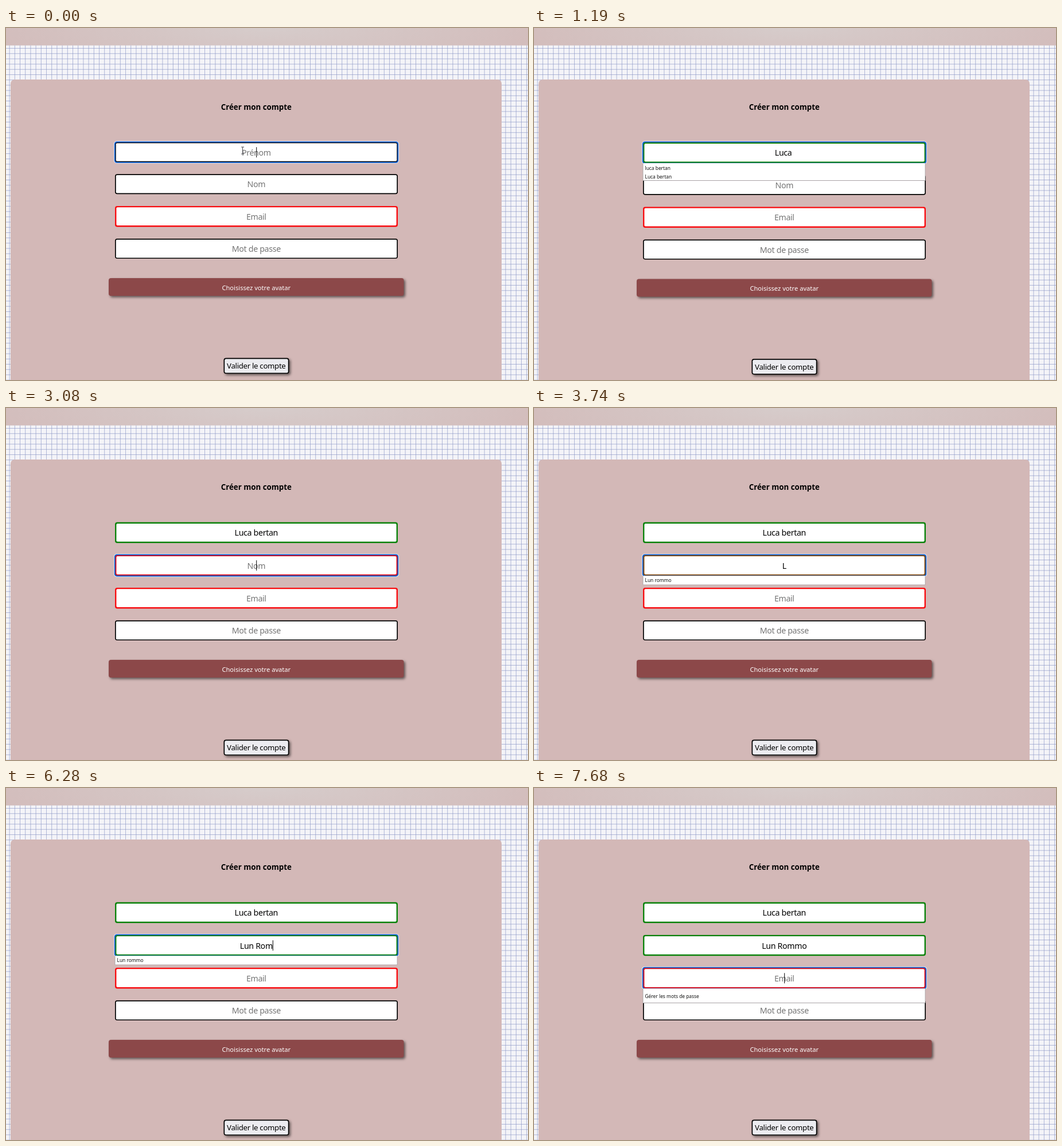
Write an HTML page with a canvas that moves like this. It is 910 by 615 pixels and loops after 8000 ms.

```html
<!DOCTYPE html>
<html lang="fr">
<head>
<meta charset="utf-8">
<title>Créer mon compte</title>
<style>
html, body { margin: 0; width: 100%; height: 100%; overflow: hidden; background: #f4f4f8; }
canvas { display: block; width: 910px; height: 615px; }
</style>
</head>
<body>
<canvas id="stage" width="910" height="615"></canvas>
<script>
const ctx = document.getElementById('stage').getContext('2d');
const LOOP = 8000, MID = 436.3, LEFT = 190, WIDTH = 493;
const FONT = '"Noto Sans", "Open Sans", sans-serif';
const GREEN = '#0a820a', RED = '#f80c10', BLACK = '#000';

const FIRST = 'Luca bertan', LAST = 'Lun Rommo';
// moment at which each letter is typed
const firstKeys = [330, 530, 730, 930, 1130, 1400, 1530, 1600, 1790, 2010, 2140];
const lastKeys = [3670, 3940, 4280, 4740, 5750, 5950, 6280, 6420, 7010];
const lastLetters = ['L', 'u', 'n', ' ', 'R', 'o', 'm', 'm', 'o'];
// caret toggles, starting visible
const blinks = [130, 660, 1190, 1720, 2270, 2800, 3470, 4000, 4540, 5090, 5620, 6150, 6680, 7210];
const FOCUS_LAST = 2930, FOCUS_MAIL = 7610;

const typed = (text, keys, t) => text.slice(0, keys.filter(k => t >= k).length);

function box(x, y, w, h, r, color) {
  ctx.fillStyle = color;
  ctx.beginPath();
  ctx.roundRect(x, y, w, h, r);
  ctx.fill();
}

function shadowBox(x, y, w, h, r, color) {
  ctx.save();
  ctx.shadowColor = 'rgba(0,0,0,.55)';
  ctx.shadowBlur = 4;
  ctx.shadowOffsetX = ctx.shadowOffsetY = 2.5;
  box(x, y, w, h, r, color);
  ctx.restore();
}

function label(text, x, y, size, color, opt = {}) {
  ctx.font = `${opt.weight || 400} ${size}px ${FONT}`;
  ctx.letterSpacing = (opt.spacing || 0) + 'px';
  ctx.fillStyle = color;
  const w = ctx.measureText(text).width;
  ctx.fillText(text, opt.left ? x : x - w / 2, y);
  return w;
}

function grid() {
  ctx.fillStyle = '#f4f4f8';
  ctx.fillRect(0, 0, 910, 615);
  ctx.fillStyle = 'rgba(135,145,195,.62)';
  const step = 9.2;
  for (let x = 5.6; x < 910; x += step) ctx.fillRect(x, 30, 1, 585);
  for (let y = 35; y < 615; y += step) ctx.fillRect(0, y, 910, 1);
}

function header() {
  ctx.save();
  ctx.beginPath();
  ctx.rect(0, 0, 910, 30.5);
  ctx.clip();
  ctx.translate(455, 0);
  ctx.scale(1, .16);
  const g = ctx.createRadialGradient(0, 0, 0, 0, 0, 480);
  g.addColorStop(0, '#d6cccb');
  g.addColorStop(1, '#d3bdbc');
  ctx.fillStyle = g;
  ctx.fillRect(-455, 0, 910, 200);
  ctx.restore();
}

function field(y, f, caret) {
  const h = f.thick ? 36.5 : 35;
  const line = f.thick ? 2.4 : 1.7;
  if (f.focus) {
    box(LEFT - 2, y - 2, WIDTH + 4, h + 4, 5, '#eef2fb');
    box(LEFT - 1.2, y - 1.2, WIDTH + 2.4, h + 2.4, 4.5, '#0b5fd0');
    box(LEFT + .6, y + .6, WIDTH - 1.2, h - 1.2, 3.5, f.color);
  } else {
    box(LEFT, y, WIDTH, h, 4, f.color);
  }
  box(LEFT + line, y + line, WIDTH - 2 * line, h - 2 * line, 2, '#fff');
  const top = y + (h - 36.5) / 2;
  const w = label(f.value || f.hint, MID, top + 23.9, 14.2, f.value ? BLACK : '#757575', { spacing: -.33 });
  if (f.focus && caret) {
    ctx.fillStyle = BLACK;
    ctx.fillRect(f.value ? MID + w / 2 : MID - .1, top + 9.4, 1, 18);
  }
}

function list(y, h, rows, firstRow) {
  box(LEFT - .5, y, WIDTH, h, 1, '#a9a3a6');
  box(LEFT + .4, y + .3, WIDTH - 1.8, h - 1.2, 0, '#fff');
  rows.forEach((row, i) => label(row, 193.5, firstRow + i * 15, 8.4, '#111', { left: true }));
}

function pointer(x, y) {
  ctx.strokeStyle = '#4a4a50';
  ctx.lineWidth = 1;
  ctx.beginPath();
  ctx.moveTo(x - 2.5, y - 6);
  ctx.lineTo(x + 2.5, y - 6);
  ctx.moveTo(x, y - 6);
  ctx.lineTo(x, y + 6);
  ctx.moveTo(x - 2.5, y + 6);
  ctx.lineTo(x + 2.5, y + 6);
  ctx.stroke();
}

function draw(t) {
  const first = typed(FIRST, firstKeys, t);
  const last = typed(lastLetters.join(''), lastKeys, t);
  const onLast = t >= FOCUS_LAST && t < FOCUS_MAIL;
  const onMail = t >= FOCUS_MAIL;
  const caret = onMail || blinks.filter(b => t >= b).length % 2 === 0;
  const lastColor = t >= 4080 ? GREEN : t >= 3670 ? '#8a4a08' : t >= FOCUS_LAST ? '#e00a18' : BLACK;

  const fields = [
    { value: first, hint: 'Prénom', thick: !!first, color: first ? GREEN : BLACK, focus: t < FOCUS_LAST },
    { value: last, hint: 'Nom', thick: t >= FOCUS_LAST, color: lastColor, focus: onLast },
    { hint: 'Email', thick: true, color: onMail ? '#e60a14' : RED, focus: onMail },
    { hint: 'Mot de passe', color: BLACK }
  ];

  grid();
  header();
  box(8, 90, 856, 560, 7, '#d3b8b7');
  label('Créer mon compte', MID, 142.6, 13.3, BLACK, { weight: 700 });

  let y = 199.5;
  const tops = fields.map(f => {
    const top = y;
    y += f.thick ? 57.2 : 55.7;
    return top;
  });
  fields.forEach((f, i) => field(tops[i], f, caret));

  const base = tops[3];
  shadowBox(179, base + 69, 514.5, 31, 4, '#8c4849');
  label('Choisissez votre avatar', MID, base + 89.5, 11.15, '#fff');
  shadowBox(379.5, base + 208.5, 114, 27.5, 4, BLACK);
  box(381.2, base + 210.2, 110.6, 24.1, 2.5, '#ececf0');
  label('Valider le compte', MID, base + 227.2, 13.2, BLACK, { spacing: -.3 });

  if (t >= 400 && t < 3010) {
    ctx.globalAlpha = t < FOCUS_LAST ? 1 : .5;
    list(236, 31, [FIRST.toLowerCase(), FIRST], 247.6);
    ctx.globalAlpha = 1;
  }
  if (t >= 3740 && t < FOCUS_MAIL) list(293, 16.3, ['Lun rommo'], 304.4);
  if (t >= 7680) list(350.3, 25.7, ['Gérer les mots de passe'], 366.8);
  if (t < 330) pointer(412.5, 214);
}

const start = performance.now();
function tick() {
  draw((performance.now() - start) % LOOP);
  requestAnimationFrame(tick);
}
tick();
</script>
</body>
</html>
```
